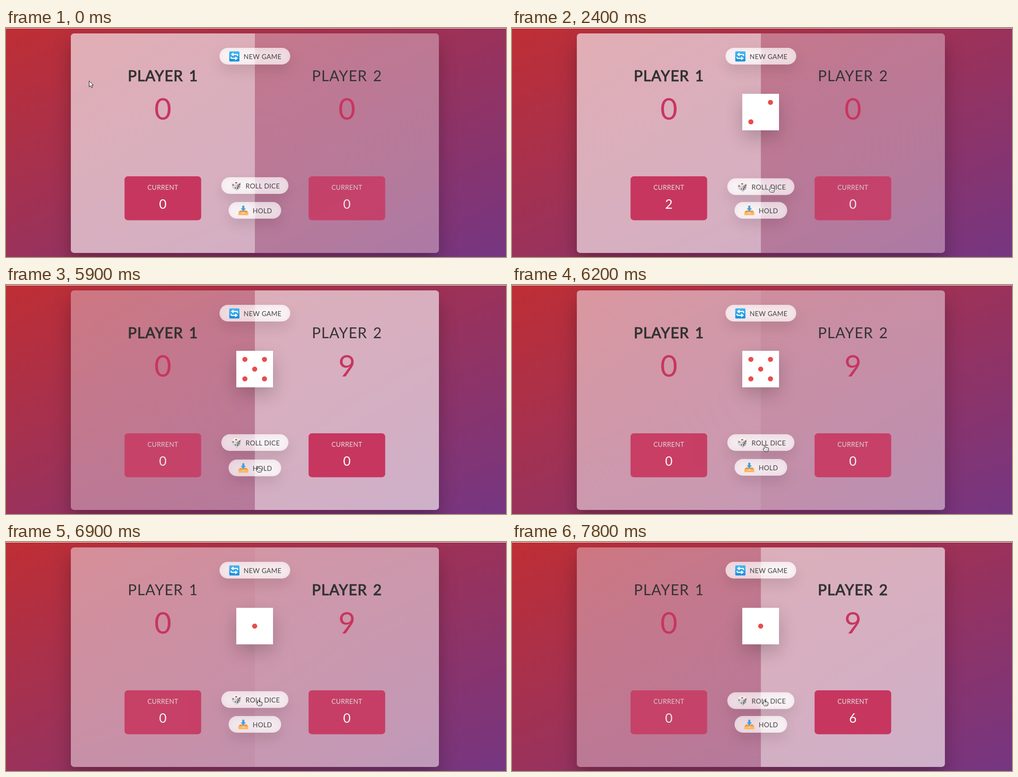
Write an HTML page that moves like this. It is 1103 px wide and 508 px high and loops after 8000 ms.

```html
<!DOCTYPE html>
<html lang="en">
<head>
<meta charset="utf-8">
<title>Dice game</title>
<style>
  html, body { margin: 0; width: 100%; height: 100%; overflow: hidden; background: #fff; }
  body { position: relative; font-family: Lato, "Open Sans", sans-serif; }
  body > *, main * { position: absolute; }
  svg { left: 0; top: 0; overflow: visible; }
  text { text-anchor: middle; letter-spacing: .025em; }

  .backdrop { inset: 1px 0 -1px; background: linear-gradient(to top left, #753682, #bf2e34); }
  main {
    left: 143px; top: 11.5px; width: 812px; height: 487.2px;
    border-radius: 7.3px; overflow: hidden;
    background: rgba(255, 255, 255, .35);
    backdrop-filter: blur(162px); filter: blur(0);
  }
  .shade {
    left: 143px; top: 11.5px; width: 812px; height: 487.2px; border-radius: 7.3px;
    box-shadow: 0 24.4px 40.6px rgba(0, 0, 0, .25);
    clip-path: path(evenodd, "M-143-12H960V500H-143ZM7 0H805Q812 0 812 7V480Q812 487.2 805 487.2H7Q0 487.2 0 480V7Q0 0 7 0Z");
  }

  .player { top: 0; width: 406px; height: 100%; }
  .name { font-size: 32.5px; letter-spacing: .036em; word-spacing: .1em; fill: #333; stroke-linejoin: round; }
  .active .name { stroke: #333; stroke-width: 1.2px; }
  .score { font-size: 65px; letter-spacing: 0; fill: #c7365f; }
  .label { font-size: 14.4px; letter-spacing: .02em; fill: #ddd; }
  .value { font-size: 28.4px; letter-spacing: 0; fill: #fff; }

  .btn {
    height: 37.3px; border-radius: 19px;
    background: rgba(255, 255, 255, .6); backdrop-filter: blur(8px);
    box-shadow: 0 14.2px 28.4px rgba(0, 0, 0, .1);
  }
  .btn text { font-size: 14.6px; fill: #444; }
  .die {
    left: 365.2px; top: 134px; width: 81.2px; height: 81.2px;
    background: #fff; box-shadow: 0 16.2px 40.6px rgba(0, 0, 0, .2);
  }
  .die circle { fill: #e84c4c; }
  .cursor path { stroke: #111; stroke-width: 1; fill: #fff; stroke-linejoin: round; }
</style>
</head>
<body>
<div class="backdrop"></div>
<div class="shade"></div>
<main></main>
<svg class="cursor" width="1" height="1">
  <path class="arrow" d="M.5.5V13.6L3.5 10.9 5.6 15.6 7.9 14.6 5.9 10H9.8Z"/>
  <g class="hand">
    <path d="M-1.5 7.5V1.5Q-1.4.4 0 .4T1.5 1.5V5H6Q8 5.2 8 7V10L6.5 13.3H-.5L-4 9Q-4.4 7.2-2.8 7.2Z"/>
    <path d="M1.4 8.5V11M3.5 8.5V11M5.6 8.5V11" style="stroke-width:.6"/>
  </g>
</svg>

<script>
const LOOP = 8000;
const $ = (selector, root = document) => root.querySelector(selector);
const main = $('main');

const icons = {
  renew: `<linearGradient id="blue" x2="0" y2="1"><stop stop-color="#45b9f3"/><stop offset="1" stop-color="#168edc"/></linearGradient>
    <rect x=".5" y=".5" width="22.5" height="22.5" rx="2" fill="url(#blue)"/>
    <g id="turn"><path d="M19 11V9.5Q19 7.5 17 7.5H9" fill="none" stroke="#fff" stroke-width="2.4"/>
    <path d="M10 3 4 7.5 10 12Z" fill="#fff"/></g>
    <use href="#turn" transform="rotate(180 11.75 11.75)"/>`,
  cube: `<path d="M1.5 5.5 11 1 22 4.5 13 9.5Z" fill="#f4f2f2"/>
    <path d="M1.5 5.5 13 9.5 12.5 22.5 3 16.5Z" fill="#d8d6d7"/>
    <path d="M22 4.5 13 9.5 12.5 22.5 20.5 16Z" fill="#aaa8ab"/>
    <ellipse cx="11.8" cy="5.2" rx="2.4" ry="1.3" fill="#d63a34"/>
    <g fill="#444"><circle cx="5" cy="10" r="1.3"/><circle cx="10" cy="16.5" r="1.3"/>
    <circle cx="19.3" cy="8.7" r="1.2"/><circle cx="17" cy="12.5" r="1.2"/><circle cx="14.8" cy="16.5" r="1.2"/></g>`,
  tray: `<path d="M4 11.5H19L22.5 16H.5Z" fill="#e59c48"/>
    <path d="M.5 15.5H7Q8 18 11.5 18T16 15.5H22.5V21Q22.5 22 21.5 22H1.5Q.5 22 .5 21Z" fill="#fbb95f"/>
    <path d="M9.2 1H13.8V7H17.3L11.5 13 5.7 7H9.2Z" fill="#3d9fe0"/>`
};

function addPlayer(number, left) {
  main.insertAdjacentHTML('beforeend', `<div class="player" style="left:${left}px"><svg width="406" height="487">
    <text class="name" x="203.3" y="105.8">PLAYER ${number}</text>
    <text class="score" x="203" y="191.2">0</text>
    <g class="current"><rect x="118.5" y="317" width="169" height="97.5" rx="7.3" fill="#c7365f"/>
    <text class="label" x="203" y="347.1">CURRENT</text>
    <text class="value" x="203" y="388.8">0</text></g></svg></div>`);
  return main.lastChild;
}

function addButton(label, icon, top, width, textX) {
  main.insertAdjacentHTML('beforeend', `<div class="btn" style="left:${406 - width / 2}px;top:${top}px;width:${width}px">
    <svg width="${width}" height="37"><g transform="translate(21 7.2)">${icons[icon]}</g>
    <text x="${textX}" y="25">${label}</text></svg></div>`);
  return main.lastChild;
}

const players = [addPlayer(1, 0), addPlayer(2, 406)];
const pips = [[0, 0], [1, -1], [-1, 1], [-1, -1], [1, 1]];
main.insertAdjacentHTML('beforeend', `<div class="die"><svg width="81" height="81">${pips.map(([x, y]) =>
  `<circle cx="${40.6 + 21.6 * x}" cy="${40.6 + 21.6 * y}" r="5.6"/>`).join('')}</svg></div>`);
const die = main.lastChild;
addButton('NEW GAME', 'renew', 32.5, 156, 95);
const roll = addButton('ROLL DICE', 'cube', 319.1, 148, 91.4);
const hold = addButton('HOLD', 'tray', 374.3, 115.6, 74.6);

const clamp = x => Math.min(1, Math.max(0, x));

// CSS "ease", cubic-bezier(.25, .1, .25, 1)
function ease(x) {
  x = clamp(x);
  let lo = 0, hi = 1;
  const bezier = (u, a, b) => 3 * u * (1 - u) * ((1 - u) * a + u * b) + u ** 3;
  for (let i = 0; i < 20; i++) {
    const mid = (lo + hi) / 2;
    if (bezier(mid, .25, .25) < x) lo = mid; else hi = mid;
  }
  return bezier(lo, .1, 1);
}

// Last entry [time, ...values] that has begun
const latest = (steps, t) => steps.findLast(step => step[0] <= t);

// The screen refreshes at 10 Hz, with a few longer stalls
const stalls = [[2400, 4600], [5900, 6200], [6200, 6400], [6400, 6700], [6700, 6900], [6900, 7200], [7200, 7400]];
function refreshTime(t) {
  const stall = stalls.find(([from, to]) => t >= from && t < to);
  return stall ? stall[0] : Math.floor(t / 100) * 100;
}

const rollPresses = [[1600, 1900], [2300, 4500], [6350, 6600], [7600, 9000]];
const holdPresses = [[5700, 5900]];
function press(button, presses, t) {
  const ramp = start => clamp((t - start) / 100 + .5);
  const depth = presses.reduce((sum, [down, up]) => sum + ramp(down) - ramp(up), 0);
  button.style.transform = `translateY(${2.4 * depth}px)`;
}

const path = [
  [0, 183, 117], [400, 183, 117], [650, 330, 190], [900, 602, 300], [1000, 578, 329],
  [1300, 567.5, 349], [1400, 571, 351], [5100, 571, 351], [5600, 556, 402], [5900, 556, 402],
  [6200, 558, 356], [6400, 557, 350], [LOOP, 557, 350]
];
function moveCursor(t) {
  const next = path.findIndex(point => point[0] > t);
  const [t0, x0, y0] = path[next - 1], [t1, x1, y1] = path[next];
  const k = (t - t0) / (t1 - t0), x = x0 + (x1 - x0) * k, y = y0 + (y1 - y0) * k;
  const overButton = x > 475 && x < 623 && (y > 331 && y < 368 || y > 386);
  $('.cursor').style.transform = `translate(${x}px, ${y}px)`;
  $('.arrow').style.display = overButton ? 'none' : '';
  $('.hand').style.display = overButton ? '' : 'none';
}

const turns = [[0, 0], [4600, 1], [5900, 0], [6700, 1]];
const rolls = [[0, 0], [1800, 2], [4600, 4], [4700, 5], [6700, 1]];
const currents = [
  [[0, 0], [1800, 2], [4600, 0]],
  [[0, 0], [4600, 9], [5900, 0], [7800, 6]]
];
const scores = [[[0, 0]], [[0, 0], [5900, 9]]];

function secondPlayerGlow(t) {
  if (t < 5900) return t < 4600 ? 0 : 1;
  return t < 6700 ? 1 - ease((t - 5945) / 750) : ease((t - 6655) / 750);
}

function draw(t) {
  const turn = latest(turns, t)[1], glow = secondPlayerGlow(t);
  players.forEach((player, i) => {
    const level = i ? glow : 1 - glow;
    player.classList.toggle('active', i === turn);
    player.style.background = `rgba(255, 255, 255, ${.4 * level})`;
    $('.current', player).style.opacity = .8 + .2 * level;
    $('.score', player).textContent = latest(scores[i], t)[1];
    $('.value', player).textContent = latest(currents[i], t)[1];
  });

  const face = latest(rolls, t)[1];
  die.style.display = face ? '' : 'none';
  die.querySelectorAll('circle').forEach((pip, i) => {
    const shown = i === 0 ? face % 2 : face > (i < 3 ? 1 : 3);
    pip.style.display = shown ? '' : 'none';
  });

  press(roll, rollPresses, t);
  press(hold, holdPresses, t);
  moveCursor(t);
}

function tick() {
  draw(refreshTime(performance.now() % LOOP));
  requestAnimationFrame(tick);
}
tick();
</script>
</body>
</html>
```
